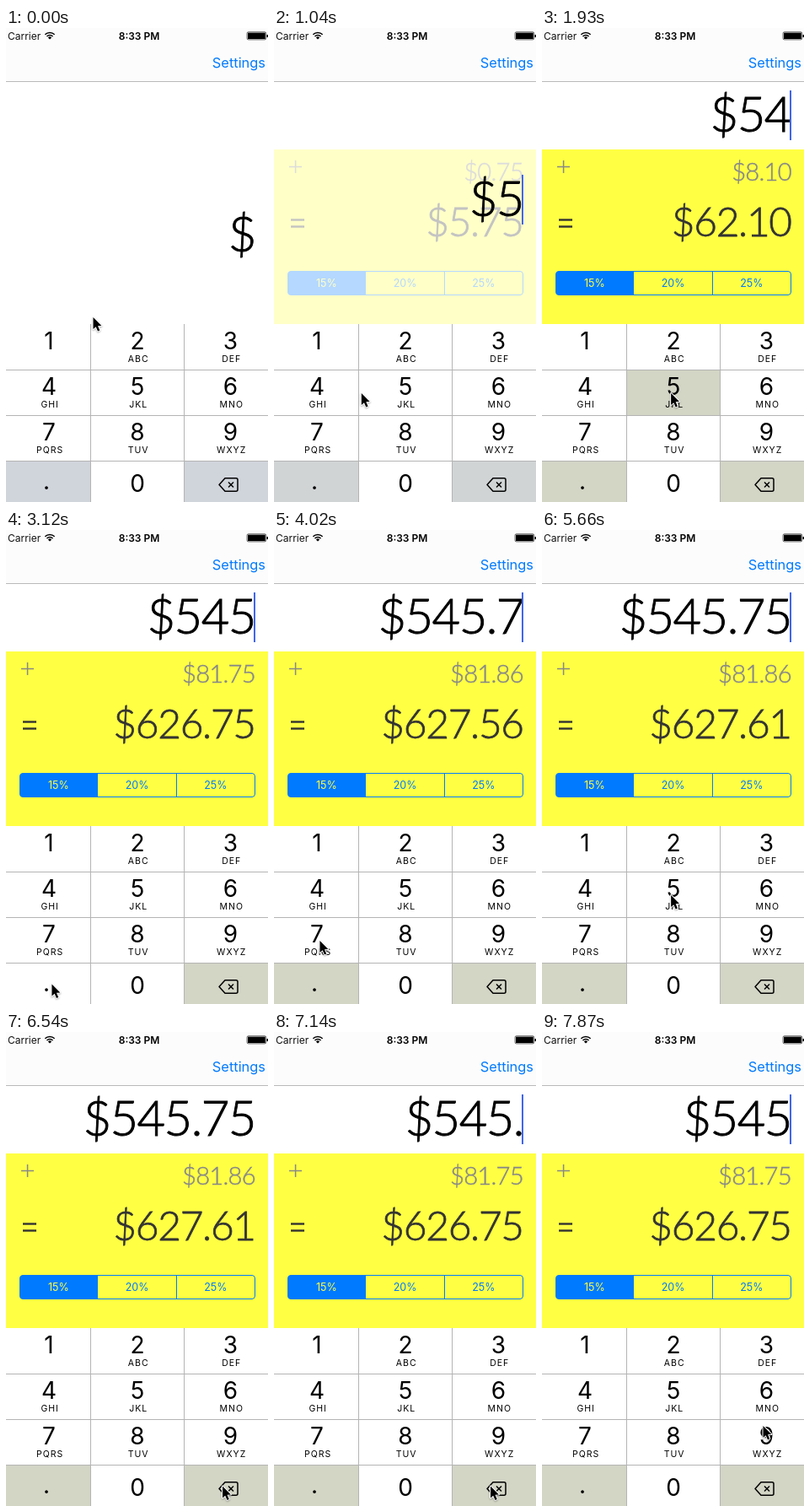
An HTML page with a canvas for the animation above (8000 ms loop, 311 by 562 pixels).

```html
<!DOCTYPE html>
<html lang="en">
<head>
<meta charset="utf-8">
<title>Tip calculator</title>
<style>
  html, body { margin: 0; width: 100%; height: 100%; overflow: hidden; background: #fff; }
  canvas { display: block; width: 311px; height: 562px; }
</style>
</head>
<body>
<canvas id="stage"></canvas>
<script>
const W = 311, H = 562, LOOP = 8000, STEP = 148.5, LAST_STEP = 53;
const BLUE = '#007aff', YELLOW = '#ffff44', RULE = '#b4b4b4';
const UI = 'Inter, sans-serif', FIGURES = 'Lato, sans-serif';
const KEY_TOP = 351, KEY_W = 111, KEY_H = 54, KEY_CENTERS = [51, 156, 266.5];
const DEL = '<', KEYS = '123456789.0' + DEL;
const LETTERS = ['', 'ABC', 'DEF', 'GHI', 'JKL', 'MNO', 'PQRS', 'TUV', 'WXYZ'];

const canvas = document.getElementById('stage');
const ctx = canvas.getContext('2d');
const ratio = window.devicePixelRatio || 1;
canvas.width = Math.round(W * ratio);
canvas.height = Math.round(H * ratio);

// The script of the demo: which key is tapped at which step.
const taps = [['5', 5], ['4', 9], ['5', 13], ['.', 21], ['7', 26], ['5', 30],
  [DEL, 45], [DEL, 47], [DEL, 50]].map(([key, at]) => ({ key, at }));

// Deleting acts on touch down, typing on release.
const editStep = tap => tap.key === DEL ? tap.at : tap.at + 1;

const stops = [
  { x: 103, y: 343, arrive: 0, leave: 0 },
  ...taps.map(tap => ({ ...keyPoint(tap.key), arrive: tap.at - 1, leave: tap.at + 1 })),
  { x: 262, y: 467, arrive: LAST_STEP, leave: LAST_STEP }
];

function keyCell(index) {
  const col = index % 3, top = KEY_TOP + Math.floor(index / 3) * KEY_H;
  return { left: Math.max(0, col * KEY_W - 10), top, center: KEY_CENTERS[col] };
}

function keyPoint(key) {
  const { center, top } = keyCell(KEYS.indexOf(key));
  return { x: center * 0.94 + 6, y: (top + Math.min(top + KEY_H, H)) / 2 + 1 };
}

function pointerAt(step) {
  const next = stops.findIndex(stop => stop.arrive >= step);
  const to = stops[next], from = stops[Math.max(0, next - 1)];
  const begin = Math.max(Math.min(from.leave, to.arrive - 1), to.arrive - 6);
  const u = Math.min(1, Math.max(0, (step - begin) / (to.arrive - begin || 1)));
  const ease = u * u * (3 - 2 * u);
  return [from.x + (to.x - from.x) * ease, from.y + (to.y - from.y) * ease];
}

function stateAt(step) {
  const edits = taps.filter(tap => editStep(tap) <= step);
  const entry = edits.reduce((s, { key }) => key === DEL ? s.slice(0, -1) : s + key, '');
  const idle = edits.length ? step - editStep(edits[edits.length - 1]) : Infinity;
  const progress = Math.min(1, Math.max(0, (step - editStep(taps[0])) / 2));
  const pressed = taps.find(tap => tap.at === step);
  return {
    entry,
    caret: idle < 11,
    reveal: 1 - Math.cos(progress * Math.PI / 2),
    pressed: pressed && pressed.key
  };
}

function rect(x, y, w, h, color) {
  ctx.fillStyle = color;
  ctx.fillRect(x, y, w, h);
}

function text(str, x, y, font, color, align = 'left', spacing = 0) {
  ctx.font = font;
  ctx.fillStyle = color;
  ctx.textAlign = align;
  ctx.letterSpacing = spacing + 'px';
  ctx.fillText(str, x, y);
}

// Light figures, thickened a little by an outline.
function figures(str, y, size, color) {
  text(str, 295.8, y, `300 ${size}px ${FIGURES}`, color, 'right', -size * 0.027);
  ctx.strokeStyle = color;
  ctx.lineWidth = size * 0.016;
  ctx.lineJoin = 'miter';
  ctx.strokeText(str, 295.8, y);
}

function tracePath(points, close) {
  ctx.beginPath();
  points.forEach(([x, y]) => ctx.lineTo(x, y));
  if (close) ctx.closePath();
}

function money(value) {
  return '$' + (value + 1e-6).toFixed(2);
}

function drawHeader() {
  rect(0, 0, W, 63, '#fcfcfc');
  rect(0, 63, W, 1, '#b9b9b9');
  text('Carrier', 2, 14, '12px ' + UI, '#111');
  text('8:33 PM', 158, 14, '600 12px ' + UI, '#000', 'center');
  text('Settings', 308, 47, '16.4px ' + UI, BLUE, 'right');

  ctx.strokeStyle = '#000';
  for (const radius of [8, 5, 1.5]) {
    ctx.lineWidth = radius < 2 ? 3 : 1.5;
    ctx.beginPath();
    ctx.arc(52, 13.5, radius, -Math.PI * 0.75, -Math.PI * 0.25);
    ctx.stroke();
  }

  ctx.lineWidth = 0.6;
  ctx.beginPath();
  ctx.roundRect(286, 4.7, 22.8, 9.2, 1.8);
  ctx.stroke();
  rect(287, 5.6, 20.8, 7.4, '#000');
  rect(309.5, 8, 1.5, 3, '#000');
}

function drawSegments() {
  ctx.beginPath();
  ctx.roundRect(16.5, 288.5, 279, 28, 3.5);
  ctx.save();
  ctx.clip();
  rect(16, 288, 93, 29, BLUE);
  rect(202, 288, 1, 29, BLUE);
  ctx.restore();
  ctx.strokeStyle = BLUE;
  ctx.lineWidth = 1;
  ctx.stroke();
  ['15%', '20%', '25%'].forEach((label, i) =>
    text(label, 62.3 + i * 93.3, 307, '12.5px ' + UI, i ? BLUE : YELLOW, 'center'));
}

function drawPanel(amount, reveal) {
  if (!reveal) return;
  rect(0, 144, W, 207, YELLOW);
  rect(18, 163.8, 15, 1.5, '#888');
  rect(24.8, 157, 1.5, 15, '#888');
  for (const y of [226.3, 234.3]) rect(20, y, 16, 2.4, '#333');
  figures(money(amount * 0.15), 181, 29.2, '#888');
  figures(money(amount * 1.15), 247, 47.8, '#333');
  drawSegments();
  if (reveal < 1) rect(0, 144, W, 207, `rgba(255,255,255,${1 - reveal})`);
}

function drawEntry(entry, reveal, caret) {
  const lift = Math.round(142 * reveal);
  figures('$' + entry, 265 - lift, 58, '#000');
  if (caret) rect(294, 216 - lift, 2, 59, '#3f66ee');
}

function drawDelete() {
  ctx.strokeStyle = '#000';
  ctx.lineWidth = 1.5;
  ctx.lineJoin = 'round';
  ctx.beginPath();
  ctx.moveTo(253, 541.5);
  ctx.lineTo(260, 533.8);
  ctx.arcTo(275, 533.8, 275, 549.2, 2);
  ctx.arcTo(275, 549.2, 260, 549.2, 2);
  ctx.lineTo(260, 549.2);
  ctx.closePath();
  ctx.stroke();
  for (const d of [-3, 3]) {
    tracePath([[267 - d, 538.5], [267 + d, 544.5]]);
    ctx.stroke();
  }
}

function drawKeypad(pressed, reveal) {
  const mix = (a, b) => Math.round(a + (b - a) * reveal);
  const grey = `rgb(${mix(208, 211)},${mix(212, 213)},${mix(219, 197)})`;
  const font = '28px ' + UI;
  rect(0, KEY_TOP, W, H - KEY_TOP, '#fff');
  [...KEYS].forEach((key, i) => {
    const { left, top, center } = keyCell(i);
    const special = key === '.' || key === DEL;
    rect(left, top, KEY_W, KEY_H, special !== (key === pressed) ? grey : '#fff');
    if (key === DEL) drawDelete();
    else if (key === '.') text(key, 48, 547, font, '#000', 'center');
    else text(key, center, top + (key === '0' ? 37 : 30), font, '#000', 'center');
    text(LETTERS[i] || '', center + 1.2, top + 45, '10.5px ' + UI, '#000', 'center', 1);
  });
  for (let i = 1; i < 4; i++) rect(0, KEY_TOP + i * KEY_H, W, 1, RULE);
  for (let i = 1; i < 3; i++) rect(i * KEY_W - 11, KEY_TOP, 1, H - KEY_TOP, RULE);
}

function drawPointer([x, y]) {
  ctx.save();
  ctx.translate(x, y);
  tracePath([[0.5, 0], [0.5, 14], [3.7, 11.2], [6, 16.4], [8.3, 15.4], [6, 10.3], [10.4, 10]], true);
  ctx.shadowColor = 'rgba(0,0,0,.3)';
  ctx.shadowBlur = 2 * ratio;
  ctx.shadowOffsetY = ratio;
  ctx.lineWidth = 2;
  ctx.strokeStyle = '#fff';
  ctx.stroke();
  ctx.shadowColor = 'transparent';
  ctx.fillStyle = '#000';
  ctx.fill();
  ctx.restore();
}

function draw(time) {
  const step = Math.min(LAST_STEP, Math.floor((time + 6) / STEP));
  const { entry, caret, reveal, pressed } = stateAt(step);
  ctx.setTransform(ratio, 0, 0, ratio, 0, 0);
  rect(0, 0, W, H, '#fff');
  drawHeader();
  drawPanel(Number(entry), reveal);
  drawEntry(entry, reveal, caret);
  drawKeypad(pressed, reveal);
  drawPointer(pointerAt(step));
}

const start = performance.now();
function tick() {
  draw((performance.now() - start) % LOOP);
  requestAnimationFrame(tick);
}
tick();
</script>
</body>
</html>
```
